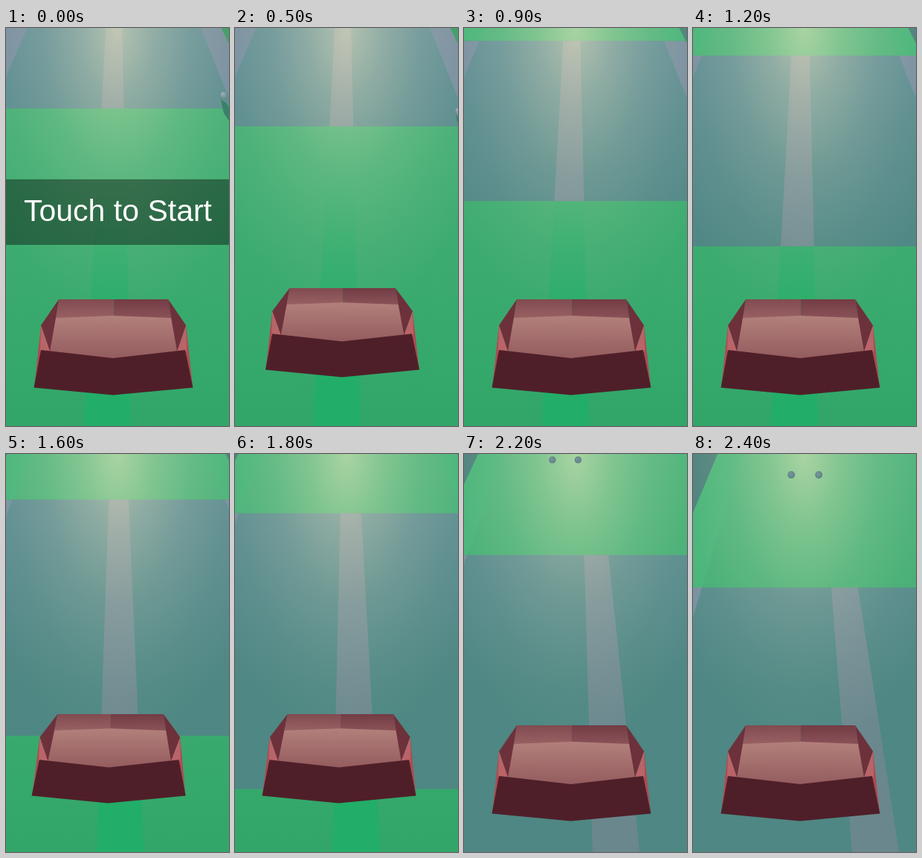
Recreate the animation shown at these times as an HTML page with a canvas. Size 300x534 px, loop 2.5 s.

```html
<!DOCTYPE html>
<html lang="en">
<head>
<meta charset="utf-8">
<title>Boat run</title>
<style>
html, body { margin: 0; width: 100%; height: 100%; overflow: hidden; background: #32a86b; }
canvas { display: block; }
</style>
</head>
<body>
<canvas id="stage" width="300" height="534"></canvas>
<script>
const W = 300, H = 534, LOOP = 2500, STEP = 100;
const HORIZON = 280;       // the vanishing point lies this far above the stage
const NEAR = 0.002577;     // depth of the blue section's near edge at the start
const SECTION = 0.00141;   // its length in the same units
const ctx = document.getElementById('stage').getContext('2d');

// Distance covered, in millionths of a depth unit, at key times.
const strokes = [[300, 0], [500, 150], [700, 489], [1200, 832],
  [1600, 1058], [2000, 1355], [2400, 1808]];

function travel(t) {
  if (t <= strokes[0][0]) return 0;
  const i = strokes.findIndex(k => k[0] >= t);
  const [t0, a] = strokes[i - 1], [t1, b] = strokes[i];
  return (a + (b - a) * (t - t0) / (t1 - t0)) / 1e6;
}

// Sideways drift of the course while the boat turns.
function drift(t) {
  const u = Math.max(0, t - 1200) / 1200;
  return -.0167 + u * (.092 - .148 * u + .19 * u * u);
}

const steer = t => t > 1200 && t < 2000 ? Math.sin(Math.PI * (t - 1200) / 800) : 0;
const screenY = depth => 1 / depth - HORIZON;
const screenX = (side, y) => W / 2 + side * (y + HORIZON);

function poly(fill, points) {
  ctx.beginPath();
  for (const [x, y] of points) ctx.lineTo(x, y);
  ctx.closePath();
  ctx.fillStyle = fill;
  ctx.fill();
}

function fade(y0, c0, y1, c1) {
  const g = ctx.createLinearGradient(0, y0, 0, y1);
  g.addColorStop(0, c0);
  g.addColorStop(1, c1);
  return g;
}

const green = {
  outside: '#4a7f7c',
  edge: '#46b479',
  base: fade(0, '#4cb27a', H, '#31a668'),
  lane: fade(200, 'rgba(34,174,104,0)', 460, '#22ae68')
};
const blue = {
  outside: '#3c9a66',
  edge: '#788fa0',
  base: fade(0, '#628f97', 320, '#4e8783'),
  lane: fade(0, '#7f969f', 400, '#69878d')
};

function ground(top, bottom, shift, look) {
  const y0 = Math.max(0, top), y1 = Math.min(H, bottom);
  if (y1 <= y0) return;
  const strip = (a, b, fill) => poly(fill, [
    [screenX(a + shift, y0), y0], [screenX(b + shift, y0), y0],
    [screenX(b + shift, y1), y1], [screenX(a + shift, y1), y1]]);
  strip(-2, 2, look.outside);
  strip(-.535, .515, look.edge);
  strip(-.418, .418, look.base);
  strip(-.039, .039, look.lane);
}

function glow() {
  ctx.save();
  ctx.translate(W / 2, 0);
  ctx.scale(.5, 1);
  const g = ctx.createRadialGradient(0, 0, 0, 0, 0, 400);
  [.52, .3, .14, .05, 0].forEach((a, i) => g.addColorStop(i / 4, `rgba(255,242,200,${a})`));
  ctx.fillStyle = g;
  ctx.fillRect(-W, 0, 2 * W, 400);
  ctx.restore();
}

function ball(side, depth, light) {
  const y = screenY(depth), x = screenX(side, y), r = (y + HORIZON) * .0162;
  const g = ctx.createRadialGradient(x - r * .3, y - r * .4, 0, x, y, r);
  g.addColorStop(0, light);
  g.addColorStop(1, '#5f8587');
  ctx.fillStyle = g;
  ctx.beginPath();
  ctx.arc(x, y, r, 0, 7);
  ctx.fill();
  return [x, y];
}

function boat(raised, turn) {
  const mid = 144.6, top = 364;
  const mapY = y => raised ? top - 15 + (y - top) * (.87 + .00046 * (y - top)) : y;
  const place = ([x, y]) => [
    mid + (x - mid) * (raised ? .968 : 1) - turn * (4 + .02 * (y - top)), mapY(y)];
  const panel = (fill, ...points) => poly(fill, points.map(place));
  const shade = (y0, c0, y1, c1) => fade(mapY(y0), c0, mapY(y1), c1);
  const floor = shade(386, '#b2807b', 443, '#945c5e');
  const backs = [shade(364, '#814b51', 389, '#986062'), shade(364, '#733c45', 389, '#8a5157')];

  for (const half of [0, 1]) {
    const side = (fill, ...points) =>
      panel(fill, ...points.map(([x, y]) => [half ? 2 * mid - x : x, y]));
    side('#ad4b51', [47, 399], [53, 432], [38, 482]);
    side(floor, [66, 386], [mid + .5, 385], [mid + .5, 444], [54, 434]);
    side(backs[half], [71, 364], [mid, 364], [mid, 386], [67, 389]);
    side('#6d313b', [71, 364], [67, 389], [59, 434], [47, 399]);
    side('#b96468', [47, 399], [59, 434], [46, 434]);
  }
  panel('#4f1f29', [47, 432], [144, 443], [241, 432], [251.5, 482.5], [144, 492.5], [37.5, 482.5]);
}

function prompt() {
  ctx.fillStyle = 'rgba(0,0,0,.4)';
  ctx.fillRect(0, 203, W, 88);
  ctx.fillStyle = '#fff';
  ctx.font = '41px "Liberation Sans", Arial, sans-serif';
  ctx.textAlign = 'center';
  ctx.fillText('Touch to Start', 150.5, 259);
}

function draw(t) {
  const depth = NEAR - travel(t), shift = drift(t);
  const near = screenY(depth), far = screenY(depth + SECTION);
  ground(0, far, shift, green);
  ground(far, near, shift, blue);
  ground(near, H, shift, green);
  glow();
  const [x, y] = ball(shift + .403, depth + .000126, '#a5b5bd');
  poly('#388269', [[x - 4, y + 6], [x + 3, y + 10], [x + 8, y + 18], [x + 8, y + 36], [x, y + 24]]);
  for (const side of [-.175, -.055]) ball(shift + side, depth + .002478, '#7b969b');
  const beat = t % 1200;
  boat(beat >= 300 && beat < 900, steer(t));
  if (t < 300) prompt();
}

const start = performance.now();
function tick() {
  const t = (performance.now() - start) % LOOP;
  draw(Math.floor(t / STEP) * STEP);
  requestAnimationFrame(tick);
}
tick();
</script>
</body>
</html>
```
